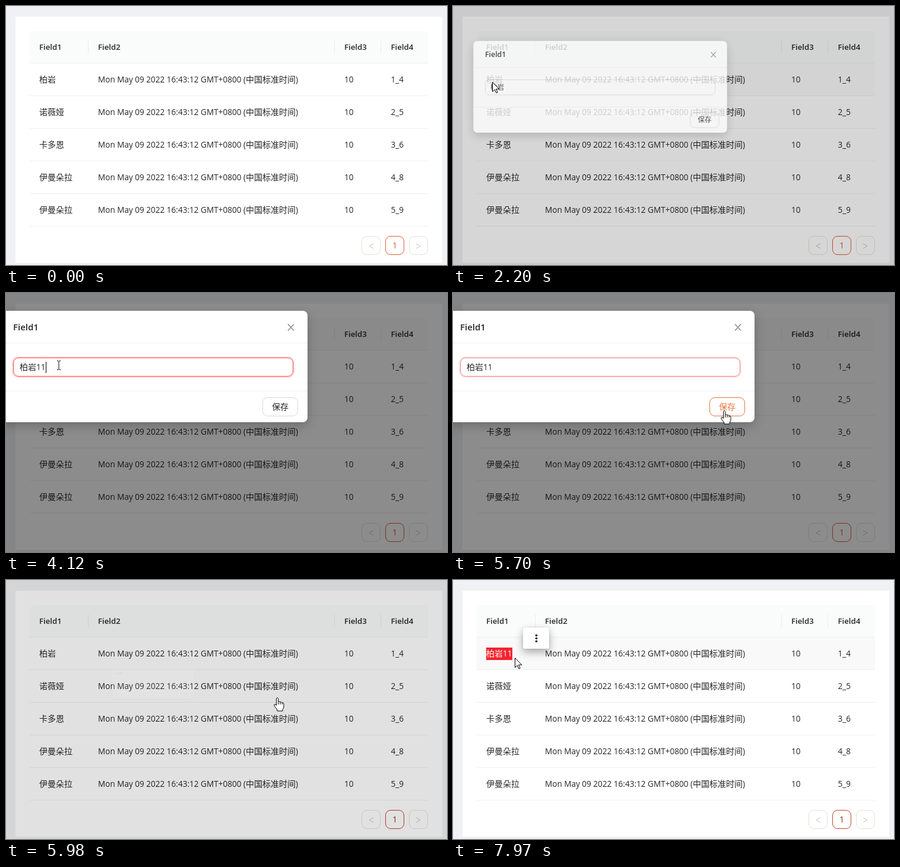
Animation of 743x437 px, one loop 8 s. Source, as an HTML page:

```html
<!DOCTYPE html>
<html lang="zh">
<head>
<meta charset="utf-8">
<title>Editable table</title>
<style>
  html, body { margin: 0; width: 100%; height: 100%; overflow: hidden; }
  body { position: relative; background: #f0f1f4; color: #262626; font: 13.55px/22px "Open Sans", sans-serif; }
  div, svg, span { position: absolute; box-sizing: border-box; white-space: nowrap; }
  i { font: 14px/0 "Noto Sans CJK SC", "Noto Sans CJK", sans-serif; }
  #card { left: 16px; top: 18px; width: 719px; height: 415px; background: #fff; }
  .row { left: 40px; width: 671px; height: 55px; border-bottom: 1px solid #f0f0f0; }
  .row span { top: 16px; }
  .head { top: 42px; background: #fafbfb; border-radius: 8px 8px 0 0; font-size: 13.2px; font-weight: 600; }
  .split { top: 16px; width: 1px; height: 22px; background: #ececec; }
  .page { top: 388px; width: 32px; height: 32px; border: 1px solid #e2e1da; border-radius: 9px; text-align: center; line-height: 31px; }
  .page svg { left: 10px; top: 10px; fill: none; stroke: #c4c4c0; }
  #selection { left: 56px; top: 114px; height: 21px; line-height: 20px; background: #f5222d; color: #fff; }
  #popup { left: 118px; top: 80px; width: 44px; height: 36px; background: #fff; border-radius: 3px; box-shadow: 0 6px 14px rgba(0,0,0,.32), 0 0 3px rgba(0,0,0,.15); }
  #mask { inset: 0; background: #000; }
  #modal { left: -12px; top: 30px; width: 520px; height: 188px; background: #fff; border-radius: 8px; transform-origin: 260px 163.5px; box-shadow: 0 6px 18px rgba(0,0,0,.22); }
  #title { left: 24px; top: 16px; font-size: 15px; font-weight: 600; }
  .rule { left: 0; width: 520px; height: 1px; background: #f0f0f0; }
  #input { left: 24px; top: 79px; width: 472px; height: 32px; border: 1px solid #d9d9d9; border-radius: 9px; }
  #value { left: 10px; top: 4px; }
  #caret { top: 6px; width: 1px; height: 19px; background: #000; }
  #save { left: 444px; top: 146px; width: 60px; height: 32px; border: 1px solid #d9d9d9; border-radius: 9px; text-align: center; line-height: 30px; }
  #close { left: 486px; top: 22px; stroke: #8f8a8a; stroke-width: 1.5; }
  #cursor { left: 0; top: 0; overflow: visible; stroke: #000; stroke-linejoin: round; fill: #fff; }
</style>
</head>
<body>
<div id="card"></div>
<div id="table"></div>
<div class="page" style="left:599px"><svg width="10" height="12"><path d="M9 2 2 6l7 4"/></svg></div>
<div class="page" style="left:639px" id="current">1</div>
<div class="page" style="left:679px"><svg width="10" height="12"><path d="M1 2l7 4-7 4"/></svg></div>
<div id="selection"></div>
<div id="popup"><svg width="44" height="36"><circle cx="22.5" cy="13.5" r="1.8"/><circle cx="22.5" cy="18.5" r="1.8"/><circle cx="22.5" cy="23.5" r="1.8"/></svg></div>
<div id="mask"></div>
<div id="modal">
  <span id="title">Field1</span>
  <svg id="close" width="12" height="12"><path d="M1 0.5 11 11.5M11 0.5 1 11.5"/></svg>
  <div class="rule" style="top:54px"></div>
  <div id="input"><span id="value"></span><div id="caret"></div></div>
  <div class="rule" style="top:135px"></div>
  <div id="save"><i>保存</i></div>
</div>
<svg id="cursor" width="1" height="1"><path id="pointer"/></svg>
<script>
const LOOP = 8000;
const NAME = '柏岩';
const $ = id => document.getElementById(id);
const rich = text => text.replace(/[\u4e00-\u9fff]+/g, '<i>$&</i>');
const ramp = (t, start, length) => Math.min(1, Math.max(0, (t - start) / length));
const during = (t, start, end) => t >= start && t < end;

// Table
const columns = [16, 115, 530, 608.5];
const cells = values => values.map((v, c) => `<span style="left:${columns[c]}px">${rich(v)}</span>`).join('');
const splits = [98, 513, 591].map(x => `<div class="split" style="left:${x}px"></div>`).join('');
const people = [[NAME, '1_4'], ['诺薇娅', '2_5'], ['卡多恩', '3_6'], ['伊曼朵拉', '4_8'], ['伊曼朵拉', '5_9']];
const stamp = 'Mon May 09 2022 16:43:12 GMT+0800 (中国标准时间)';
$('table').innerHTML =
  `<div class="row head">${cells(['Field1', 'Field2', 'Field3', 'Field4'])}${splits}</div>` +
  people.map(([name, code], r) =>
    `<div class="row body" style="top:${97 + 55 * r}px">${cells([name, stamp, '10', code])}</div>`).join('');
const rows = [...document.querySelectorAll('.body')];
const nameCell = rows[0].querySelector('span');
$('selection').innerHTML = rich(NAME + '11');

function bezier(x1, y1, x2, y2) {
  const at = (a, b, u) => 3 * (1 - u) ** 2 * u * a + 3 * (1 - u) * u * u * b + u ** 3;
  return x => {
    let low = 0, high = 1;
    for (let i = 0; i < 20; i++) {
      const mid = (low + high) / 2;
      if (at(x1, x2, mid) < x) low = mid; else high = mid;
    }
    return at(y1, y2, low);
  };
}
const zoomIn = bezier(.08, .82, .17, 1);
const zoomOut = bezier(.78, .14, .15, .86);

// Pointer: time, x, y
const path = [
  [190, 22, 436], [950, 56, 136], [1440, 68, 129], [1990, 68, 129], [2130, 66, 128],
  [2410, 66, 128], [2760, 89, 122], [4250, 89, 122], [5090, 455, 200], [5160, 457, 198],
  [6510, 457, 198], [6580, 423, 202], [7220, 60, 130], [7290, 60, 130], [7360, 54, 128],
  [7480, 54, 128], [7800, 104, 131], [LOOP, 104, 131]
];
const shapes = {
  arrow: 'M.5 .5V16.5L4.3 13 7 18.8 9.2 17.8 6.6 12.2H11.8Z',
  text: 'M-3 -7.5H-1L0 -6.5 1 -7.5H3M0 -6.5V6.5M-3 7.5H-1L0 6.5 1 7.5H3',
  hand: 'M-1.5 1.8Q0 -.8 1.7 1.8V7.5Q3.6 6 5 8 7 7 8.2 9 10.6 8.4 11 11V16Q11 18.5 9 20.5V23H0V21L-5.2 14Q-5.6 11 -3 12L-1.5 13.6ZM1.7 7.5V12M5 8V12M8.2 9V12'
};
const shapeTimes = [
  [0, 'arrow'], [960, 'text'], [2060, 'arrow'], [2690, 'text'], [4400, 'arrow'],
  [5160, 'hand'], [6060, 'arrow'], [7150, 'text'], [7700, 'arrow']
];
// Row hover: row, start, end
const hovers = [[3, 430, 460], [2, 460, 583], [1, 583, 780], [0, 780, 2140], [1, 6060, 6875], [0, 6875, LOOP]];

function pointerAt(t) {
  const i = Math.max(1, path.findIndex(p => p[0] > t));
  const [a, b] = [path[i - 1], path[i]];
  const u = 1 - (1 - ramp(t, a[0], b[0] - a[0])) ** 2;
  return [a[1] + (b[1] - a[1]) * u, a[2] + (b[2] - a[2]) * u];
}

function drawTable(t, pointerX) {
  rows.forEach((row, r) => {
    const level = Math.max(0, ...hovers.filter(h => h[0] === r)
      .map(([, start, end]) => ramp(t, start, 200) * (1 - ramp(t, end, 200))));
    row.style.background = `rgba(0,0,0,${.022 * level})`;
  });
  nameCell.innerHTML = rich(t < 6050 ? NAME : NAME + '11');
  $('current').style.color = t < 5750 ? '#d4582f' : '#83331a';
  $('current').style.borderColor = t < 5750 ? '#dd5a33' : '#c4432b';

  const reach = t < 7480 ? 0 : Math.max(...[0, 14, 28, 35.5, 44].filter(edge => edge <= pointerX - 52));
  $('selection').style.clipPath = `inset(0 calc(100% - ${reach}px) 0 0)`;
  $('popup').style.opacity = ramp(t, 7800, 140);
}

function drawModal(t) {
  const shown = t < 5000 ? zoomIn(ramp(t, 2143, 300)) : 1 - zoomOut(ramp(t, 5760, 300));
  $('modal').style.opacity = shown;
  $('modal').style.transform = shown < 1 ? `scale(${.2 + .8 * shown})` : 'none';
  $('mask').style.opacity = .45 * ramp(t, 2130, 200) * (1 - ramp(t, 5760, 300));

  const typed = (t >= 3770) + (t >= 4120);
  $('value').innerHTML = rich(NAME + '1'.repeat(typed));
  $('caret').style.left = 39 + 7.5 * typed + 'px';
  const caretOn = during(t, 2780, 3310) || during(t, 3770, 4650) || during(t, 5180, 5630);
  $('caret').style.display = caretOn ? '' : 'none';

  const focus = ramp(t, 2790, 300) * (1 - ramp(t, 5630, 200));
  const fade = to => Math.round(217 + (to - 217) * focus);
  $('input').style.borderColor = `rgb(${fade(255)},${fade(77)},${fade(79)})`;
  $('input').style.boxShadow = `0 0 0 2px rgba(255,77,79,${.22 * focus})`;
  $('save').style.borderColor = t < 5160 ? '#d9d9d9' : '#e8743b';
  $('save').style.color = t < 5160 ? '#262626' : '#e8743b';
}

function draw(now) {
  const t = now % LOOP;
  const [x, y] = pointerAt(t);
  drawTable(t, x);
  drawModal(t);
  $('cursor').style.visibility = t < 190 ? 'hidden' : 'visible';
  $('cursor').style.transform = `translate(${Math.round(x)}px,${Math.round(y)}px)`;
  const shape = shapeTimes.filter(s => s[0] <= t).pop()[1];
  $('pointer').setAttribute('d', shapes[shape]);
  $('pointer').setAttribute('fill', shape === 'text' ? 'none' : '#fff');
  requestAnimationFrame(draw);
}
draw(0);
</script>
</body>
</html>
```
